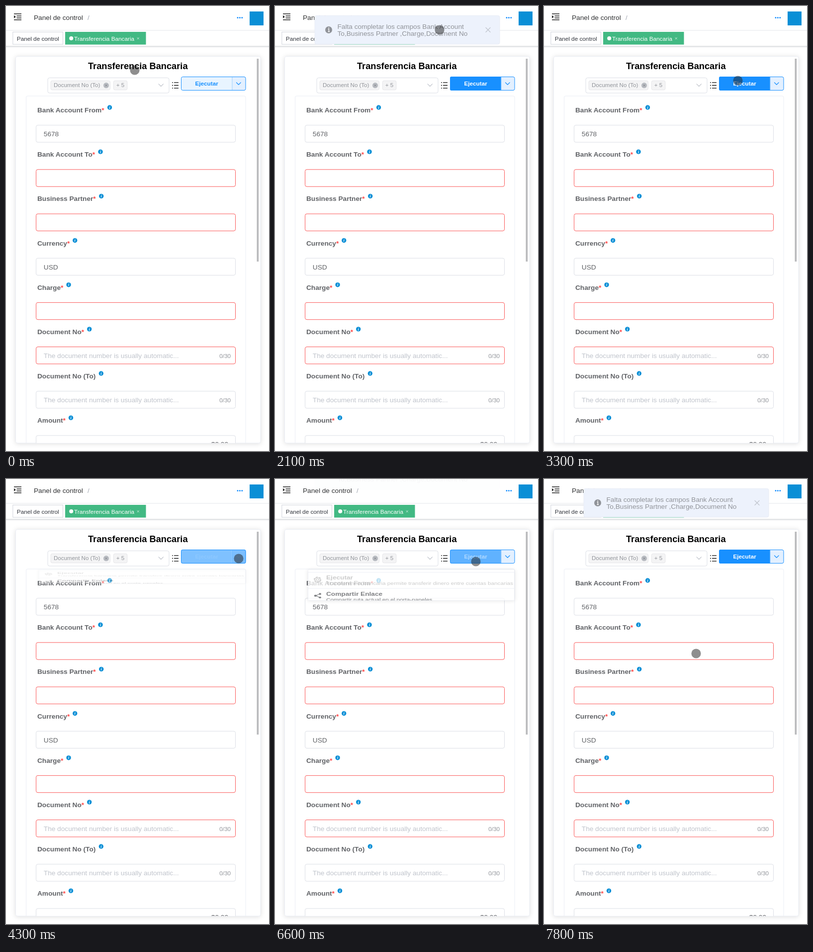
Recreate the animation shown at these times as an HTML page. Size 529x895 px, loop 8000 ms.

```html
<!DOCTYPE html>
<html lang="es">
<head>
<meta charset="utf-8">
<title>Transferencia Bancaria</title>
<style>
  html, body { margin: 0; width: 100%; height: 100%; overflow: hidden; background: #fff; }
  svg { display: block; width: 529px; height: 895px; font: 13.67px "Liberation Sans", sans-serif; }
  .b { font-weight: bold; }
  .s { font-size: 11.75px; }
  .line { fill: none; stroke-width: 1.2; stroke-linecap: round; stroke-linejoin: round; }
  .soft { filter: drop-shadow(0 1px 5px rgba(0, 0, 0, .13)); }
</style>
</head>
<body>
<svg viewBox="0 0 529 895">
  <defs>
    <clipPath id="cardClip"><rect x="19" y="101" width="493" height="778"/></clipPath>
    <clipPath id="menuClip"><rect x="66" y="182" width="416" height="83"/></clipPath>
  </defs>

  <!-- header -->
  <g stroke="#222" stroke-width="1.5">
    <path d="M16 15.7H31M21.5 19.9H31M21.5 23.9H31M16 27.8H31"/>
    <path d="M16 18.8L19.8 21.8L16 24.8Z" fill="#222" stroke="none"/>
  </g>
  <text x="56" y="28" fill="#303133">Panel de control</text>
  <text x="164" y="28" fill="#a3a8b2">/</text>
  <g fill="#1890ff"><circle cx="466" cy="23.5" r="1.5"/><circle cx="470.4" cy="23.5" r="1.5"/><circle cx="474.8" cy="23.5" r="1.5"/></g>
  <rect x="490" y="11" width="28" height="28" fill="#0a8fd6"/>
  <path d="M0 49H529" stroke="#eceef1" stroke-width="1.5"/>

  <!-- tabs -->
  <rect x="13.8" y="52.3" width="100.6" height="24.8" fill="#fff" stroke="#d0d4dc"/>
  <text class="s" x="21.8" y="70" fill="#30343c">Panel de control</text>
  <rect x="119" y="52" width="162.5" height="25.6" fill="#42b983"/>
  <circle cx="131.2" cy="65" r="4" fill="#fff"/>
  <text class="s" x="137" y="70" fill="#fff">Transferencia Bancaria</text>
  <path d="M263.7 63.2l4 4m0-4l-4 4" stroke="#fff" stroke-width=".8" opacity=".85"/>
  <path d="M0 81.2H529" stroke="#dcdee1" stroke-width="2"/>
  <path d="M0 83H529" stroke="#f5f5f6" stroke-width="2"/>

  <!-- card -->
  <rect class="soft" x="19.5" y="101.5" width="492.5" height="777.5" rx="3.5" fill="#fff" stroke="#ebeef5"/>
  <rect x="504.5" y="106" width="3.7" height="408" fill="#b9babc"/>
  <text class="b" x="165" y="127" font-size="18.23">Transferencia Bancaria</text>

  <rect x="84" y="144.5" width="244" height="30.5" rx="3.5" fill="#fff" stroke="#dcdfe6"/>
  <g fill="#f4f4f5" stroke="#e6e6e9"><rect x="90" y="150.3" width="119.5" height="18.5" rx="3"/><rect x="216.3" y="150.3" width="27.6" height="18.5" rx="3"/></g>
  <g fill="#909399" font-size="11.5"><text x="96" y="163.3">Document No (To)</text><text x="221.8" y="163.3">+ 5</text></g>
  <circle cx="201.5" cy="159.7" r="5.6" fill="#b9bcc2"/>
  <path d="M199.5 157.7l4 4m0-4l-4 4" stroke="#777a80"/>
  <path class="line" d="M307 156.8l4.7 4.7l4.7-4.7" stroke="#c0c4cc"/>
  <path d="M338 154H347M338 159.6H347M338 165.2H347M334 154h2M334 159.6h2M334 165.2h2" stroke="#333" stroke-width="1.6"/>

  <g class="b s" text-anchor="middle">
    <path d="M455 142.5H355.5a3 3 0 0 0-3 3V166.500a3 3 0 0 0 3 3H455" fill="#e8f4ff" stroke="#1890ff"/>
    <text x="403.6" y="160" fill="#1890ff">Ejecutar</text>
    <g id="mainFill">
      <path d="M455 142H355a3 3 0 0 0-3 3V167a3 3 0 0 0 3 3H455Z" fill="#1890ff"/>
      <text x="403.6" y="160" fill="#fff">Ejecutar</text>
    </g>
    <path d="M455 142.5H479a3 3 0 0 1 3 3V166.500a3 3 0 0 1-3 3H455" fill="#e3f0ff" stroke="#1890ff"/>
    <path d="M455 143V169" stroke="#9fd0ff"/>
    <path class="line" d="M463.500 154l4.300 4.200l4.300-4.200" stroke="#1890ff"/>
    <g id="caretFill">
      <path d="M455 142H479.500a3 3 0 0 1 3 3V167a3 3 0 0 1-3 3H455Z" fill="#1890ff"/>
      <path class="line" d="M463.500 154l4.300 4.200l4.300-4.200" stroke="#fff"/>
    </g>
  </g>

  <g clip-path="url(#cardClip)">
    <rect x="40.500" y="181" width="441.500" height="720" rx="3" fill="none" stroke="#ebeef5"/>
    <g id="form"></g>
  </g>

  <!-- dropdown -->
  <g id="menu">
    <path d="M411 182.500l5.500-5l5.500 5Z" fill="#fff" stroke="#eef0f5"/>
    <rect class="soft" x="66.500" y="182" width="415" height="83" rx="2" fill="#fff" stroke="#e6e9f0"/>
    <g clip-path="url(#menuClip)">
      <path d="M66 189.500H482M66 232.800H482" stroke="#e6e9f0"/>
      <g fill="none" stroke="#bbb">
        <circle cx="85.500" cy="209" r="6.600" stroke-width="2.200" stroke-dasharray="3.450"/>
        <circle cx="85.500" cy="209" r="5.600" stroke-width="1.300"/><circle cx="85.500" cy="209" r="2.700" stroke-width="1.200"/>
      </g>
      <g fill="#bbb"><text class="b" x="103" y="209">Ejecutar</text><text class="s" x="103" y="223">Transferencia bancaria permite transferir dinero entre cuentas bancarias</text></g>
      <g fill="#55575b">
        <path d="M90.500 247.500L81.500 252.300L90.500 257" fill="none" stroke="#55575b" stroke-width="1.400"/>
        <circle cx="81.300" cy="252.300" r="2.600"/><circle cx="90.500" cy="247.500" r="2.400"/><circle cx="90.500" cy="257" r="2.400"/>
        <text class="b" x="103" y="252">Compartir Enlace</text><text class="s" x="103" y="267">Compartir ruta actual en el porta-papeles.</text>
      </g>
    </g>
  </g>

  <!-- message -->
  <g id="toast">
    <rect x="80" y="19.300" width="372" height="57.500" rx="3.500" fill="#edf2fc" stroke="#e8ecf5"/>
    <circle cx="108" cy="48" r="7" fill="#909399"/>
    <path d="M106.700 46.700h1.700v4.800m-1.900 0h3.600" fill="none" stroke="#fff" stroke-width="1.300"/><circle cx="108.200" cy="44.300" r="1" fill="#fff"/>
    <g fill="#909399"><text x="125.500" y="46">Falta completar los campos Bank Account</text><text x="125.500" y="60">To,Business Partner ,Charge,Document No</text></g>
    <path class="line" d="M424 43.500l9 9m0-9l-9 9" stroke="#c0c4cc"/>
  </g>

  <circle id="cursor" r="9.600" fill="#1e1e1e" fill-opacity=".5"/>
</svg>
<script>
const $ = id => document.getElementById(id);

// label, icon x, required, value, has counter
const hint = 'The document number is usually automatic...';
const fields = [
  ['Bank Account From', 208.5, 1, '5678'],
  ['Bank Account To', 190, 1, ''],
  ['Business Partner', 191.7, 1, ''],
  ['Currency', 138.7, 1, 'USD'],
  ['Charge', 126, 1, ''],
  ['Document No', 167.7, 1, hint, 1],
  ['Document No (To)', 191.3, 0, hint, 1],
  ['Amount', 130.5, 1, '$0.00']
];
$('form').innerHTML = fields.map(([label, iconX, required, value, counter], i) => {
  const invalid = required && (!value || counter);
  const money = value[0] === '$';
  return `<g transform="translate(0 ${i * 89.17})">
    <text class="b" x="63" y="214" fill="#606266">${label}${required ? '<tspan fill="#ff4949">*</tspan>' : ''}</text>
    <circle cx="${iconX}" cy="204" r="4.7" fill="#0a8fd6"/>
    <text x="${iconX}" y="206.7" fill="#fff" text-anchor="middle" style="font:italic bold 8px 'Liberation Serif',serif">i</text>
    <rect x="60.5" y="239.7" width="401" height="34.3" rx="3.5" fill="#fff" stroke="${invalid ? '#fb5a5a' : '#dcdfe6'}"/>
    <text x="${money ? 447 : 75.8}" y="262" text-anchor="${money ? 'end' : 'start'}" fill="${counter ? '#c0c4cc' : '#606266'}">${value}</text>
    ${counter ? '<text class="s" x="452" y="262" text-anchor="end" fill="#909399">0/30</text>' : ''}
  </g>`;
}).join('');

const clamp = v => Math.min(1, Math.max(0, v));

function bezier(x1, y1, x2, y2) {
  const at = (a, b, u) => 3 * a * u * (1 - u) ** 2 + 3 * b * u * u * (1 - u) + u ** 3;
  return x => {
    let lo = 0, hi = 1;
    for (let i = 0; i < 20; i++) {
      const mid = (lo + hi) / 2;
      if (at(x1, x2, mid) < x) lo = mid; else hi = mid;
    }
    return at(y1, y2, hi);
  };
}
const ease = bezier(.25, .1, .25, 1);
const easeOut = bezier(.23, 1, .32, 1);
const ramp = (t, start, length, curve = v => v) => t <= start ? 0 : t >= start + length ? 1 : curve((t - start) / length);

// time, x, y
const path = [
  [0, 259, 129], [100, 259, 129], [700, 376, 165], [1700, 376, 165],
  [2100, 331, 48], [2400, 226, 44], [2900, 226, 44], [3300, 390, 150],
  [3800, 454, 160], [4100, 468, 160], [4500, 468, 160], [5000, 403, 218],
  [5700, 403, 218], [6000, 408, 190], [6300, 404, 166], [6600, 404, 166],
  [7100, 345, 393], [7200, 345, 393], [7500, 291, 234], [7800, 306, 351], [8000, 306, 351]
];

function cursorAt(t) {
  const i = path.findIndex(p => p[0] > t);
  const [t0, x0, y0] = path[i - 1], [t1, x1, y1] = path[i];
  const k = clamp((t - t0) / (t1 - t0));
  return [x0 + (x1 - x0) * k, y0 + (y1 - y0) * k];
}

function toastAt(t) {
  if (t < 1200 || (t >= 3300 && t < 6600)) return [0, 0];
  const inAt = t < 5000 ? 980 : 6575;
  const leaving = t < 5000;
  const shown = (length) => ramp(t, inAt, length, ease) - (leaving ? ramp(t, 3000, length, ease) : 0);
  return [58 * (shown(400) - 1), shown(300)];
}

function draw(now) {
  const t = Math.floor(now % 8000 / 100) * 100;
  const [x, y] = cursorAt(t);
  $('cursor').setAttribute('transform', `translate(${x} ${y})`);

  const [shift, alpha] = toastAt(t);
  $('toast').setAttribute('transform', `translate(0 ${shift})`);
  $('toast').setAttribute('opacity', alpha);

  $('mainFill').setAttribute('opacity', ramp(t, 935, 100) - ramp(t, 4250, 100) + ramp(t, 6535, 100));
  $('caretFill').setAttribute('opacity', ramp(t, 4250, 100) - ramp(t, 5150, 100));

  const open = ramp(t, 4275, 300, easeOut) - ramp(t, 6582, 300, easeOut);
  $('menu').setAttribute('opacity', open);
  $('menu').setAttribute('transform', `translate(0 182) scale(1 ${open}) translate(0 -182)`);
  requestAnimationFrame(draw);
}
draw(0);
</script>
</body>
</html>
```
